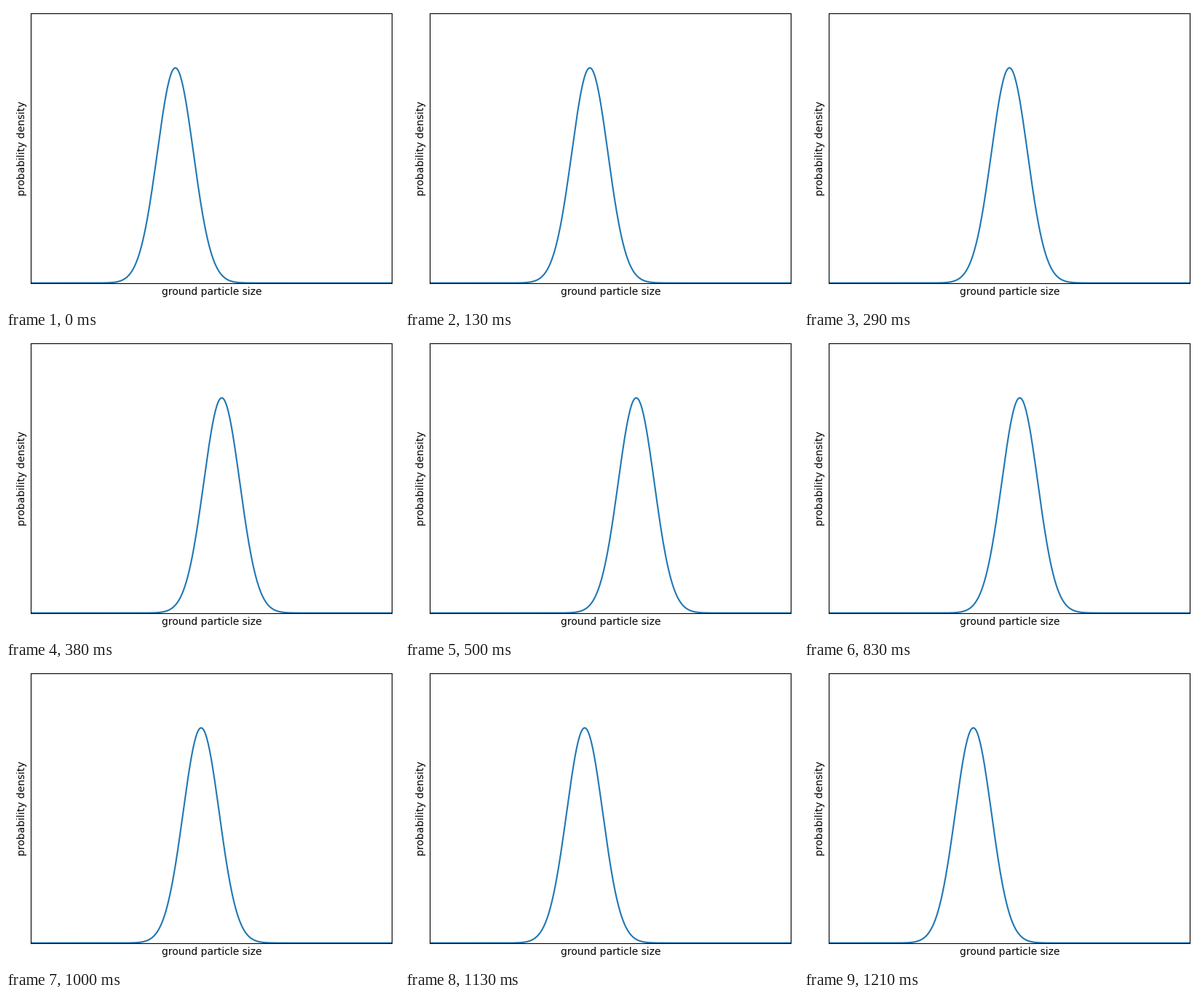
A matplotlib script for the animation above (1250 ms loop, 540 by 414 pixels).

```python
import numpy as np
import matplotlib.pyplot as plt
from matplotlib.animation import FuncAnimation

WIDTH, HEIGHT, DPI = 540, 414, 100
TICK_MS, LOOP_MS = 10, 1250
HALF = 15            # steps in each direction
SIGMA = 0.5
MARGIN = 34.3        # left and bottom axes offset, px
AXES_W, AXES_H = 496, 369.6

# The tiny surplus keeps float error from truncating a pixel row.
fig = plt.figure(figsize=((WIDTH + 1e-3) / DPI, (HEIGHT + 1e-3) / DPI),
                 dpi=DPI, facecolor="white")
ax = fig.add_axes([MARGIN / WIDTH, MARGIN / HEIGHT,
                   AXES_W / WIDTH, AXES_H / HEIGHT])
ax.set(xlim=(0, 10), ylim=(0, 1))
ax.set_xlabel("ground particle size", family="DejaVu Sans", size=10)
ax.set_ylabel("probability density", family="DejaVu Sans", size=10)
ax.tick_params(left=False, bottom=False, labelleft=False, labelbottom=False)

x = np.linspace(0, 10, 500)
curve, = ax.plot(x, np.zeros_like(x), color="#1f77b4", linewidth=1.5)


def bell(mean):
    z = (x - mean) / SIGMA
    return np.exp(-z * z / 2) / (SIGMA * np.sqrt(2 * np.pi))


def update(tick):
    # 30 even steps per loop, each start rounded to a 10 ms tick
    step = (6 * tick + 2) // 25
    pos = min(step, 2 * HALF - 1 - step)
    curve.set_ydata(bell(4 + 2 * pos / (HALF - 1)))
    return curve,


anim = FuncAnimation(fig, update, frames=LOOP_MS // TICK_MS,
                     interval=TICK_MS, repeat=True, repeat_delay=0)
plt.show()
```
